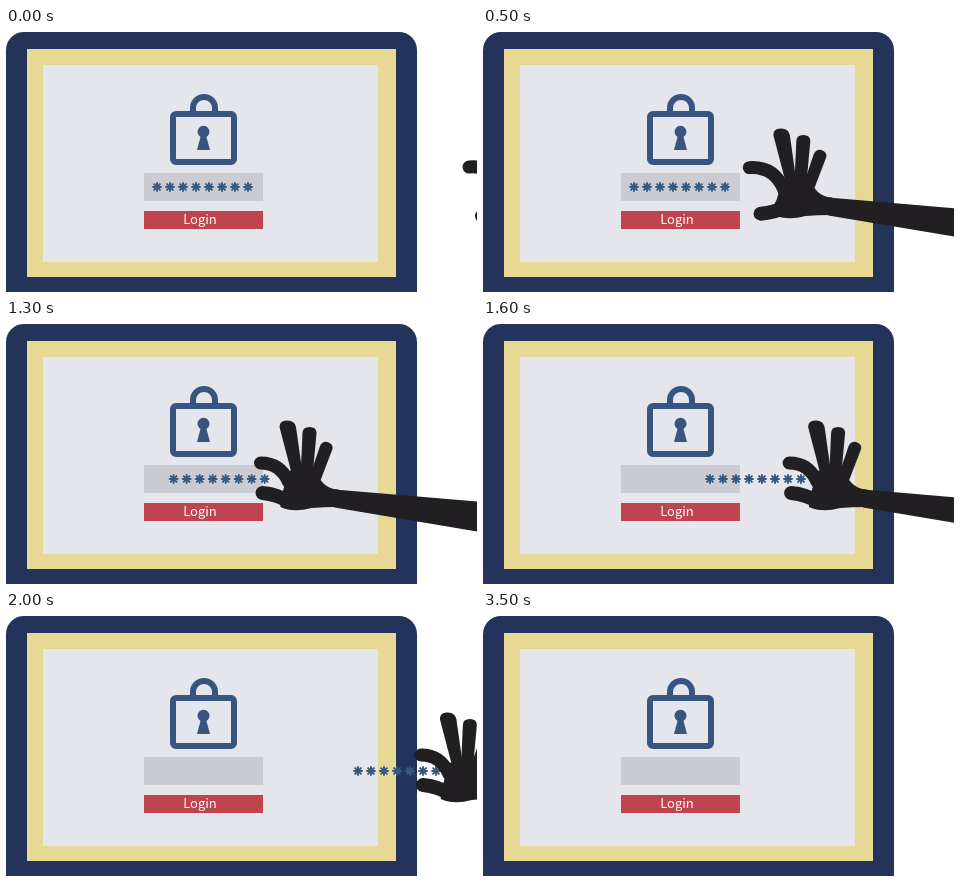
An HTML page that plays this animation: 471 by 264 pixels, repeating every 3.8 s.

```html
<!DOCTYPE html>
<html lang="en">
<head>
<meta charset="utf-8">
<title>Password theft</title>
<style>
  html, body { margin: 0; width: 100%; height: 100%; overflow: hidden; background: #fff; }
  svg { display: block; }
  text { font: 500 13px "Noto Sans CJK SC", "Noto Sans CJK JP", "Noto Sans", sans-serif; }
</style>
</head>
<body>
<svg width="471" height="264" viewBox="0 0 471 264">
  <defs>
    <path id="star" d="M-4 0H4M0-4V4M-2.9-2.9L2.9 2.9M-2.9 2.9L2.9-2.9"/>
  </defs>

  <rect x="0" y="4" width="411" height="290" rx="18" fill="#233359"/>
  <path d="M21 21H390V249H21Z" fill="#e7d894"/>
  <path d="M37 37H372V234H37Z" fill="#e5e6eb"/>

  <g fill="none" stroke="#37557f" stroke-width="6">
    <rect x="167" y="86" width="61" height="48" rx="3"/>
    <path d="M187 85V80a11 11 0 0 1 22 0V85"/>
  </g>
  <path d="M194.5 109a6 6 0 1 1 6 0L204 122H191Z" fill="#37557f"/>

  <path d="M138 145H257V173H138Z" fill="#cbccd3"/>
  <path d="M138 183H257V201H138Z" fill="#bf4450"/>
  <text x="194" y="196" text-anchor="middle" fill="#fff">Login</text>

  <g id="stars" stroke="#36597f" stroke-width="1.9" stroke-linecap="round"></g>

  <g id="hand" fill="#211f22">
    <path d="M261 107Q261 100.500 268 100.500Q276 100 277.500 107L284 153H273Z"/>
    <path d="M284 113Q284 107 291 107Q298 107 298 113L294 157H282Z"/>
    <path d="M301.500 126Q304 121 309 122Q315 124 314 129L301 163L290 160Z"/>
    <path d="M265 152Q285 147 299 155Q306 169 320 169.500L319 187Q305 187 293 188Q275 193 262 187L261 178Q269 166 265 152Z"/>
    <path d="M316 169.500L700 202V252L316 187.500Z"/>
    <g fill="none" stroke="#211f22" stroke-linecap="round">
      <path id="thumb" stroke-width="13"/>
      <path id="finger" stroke-width="14"/>
    </g>
  </g>
</svg>
<script>
const LOOP = 3800, STEP = 100;
const $ = id => document.getElementById(id);
const clamp = v => Math.min(1, Math.max(0, v));
const mix = (a, b, k) => a + (b - a) * k;

$("stars").innerHTML = Array.from({ length: 8 },
  (_, i) => `<use href="#star" x="${151 + 13 * i}" y="159"/>`).join("");

// Quadratic curve blended between two poses
function bend(id, open, closed, k) {
  const p = open.map((v, i) => mix(v, closed[i], k));
  $(id).setAttribute("d", `M${p[0]} ${p[1]}Q${p.slice(2)}`);
}

function draw(t) {
  const reach = 229 * (1 - clamp(t / 1000)) ** 2.87;
  const pull = 201 * (Math.max(0, t - 1100) / 900) ** 1.655;
  const c = clamp((t - 400) / 400);
  const grip = c * c * (3 - 2 * c);

  $("hand").setAttribute("transform", `translate(${reach + 0.87 * pull - 2})`);
  $("stars").setAttribute("transform", `translate(${pull})`);
  bend("thumb", [236, 139, 262, 137, 272, 162], [242, 143, 262, 143, 270, 162], grip);
  bend("finger", [249, 188, 262, 187, 280, 176], [244, 173, 258, 174, 274, 183], grip);
}

const start = performance.now();
function frame() {
  const t = (performance.now() - start) % LOOP;
  draw(Math.floor(t / STEP) * STEP);
  requestAnimationFrame(frame);
}
frame();
</script>
</body>
</html>
```
